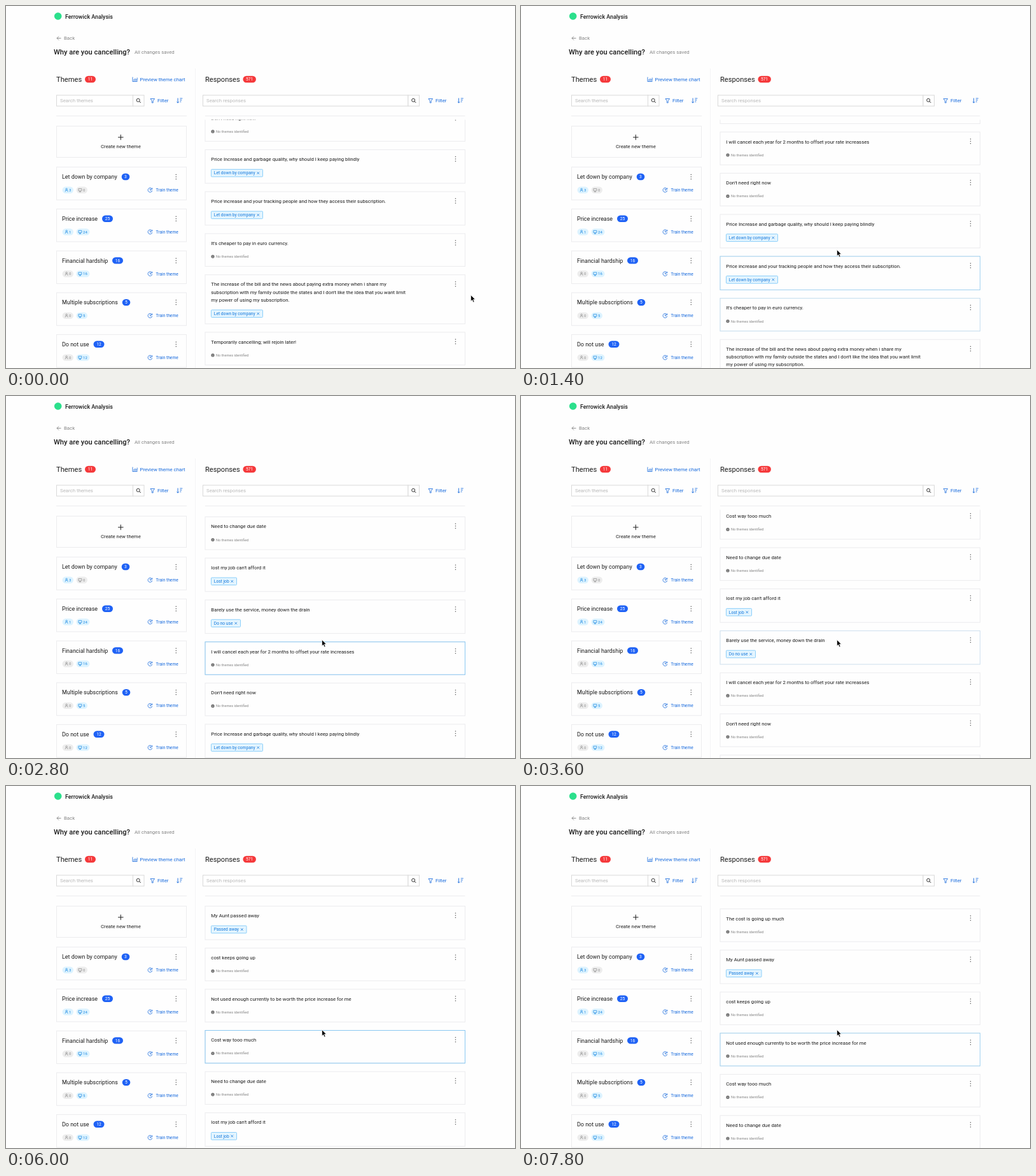
Write an HTML page that moves like this. It is 800 by 568 pixels and loops after 8000 ms.

```html
<!DOCTYPE html>
<html lang="en">
<head>
<meta charset="utf-8">
<title>Survey responses</title>
<style>
  html, body { margin: 0; width: 100%; height: 100%; overflow: hidden; background: #fefefe; }
  svg { display: block; width: 800px; height: 568px; font-family: Roboto, sans-serif; }
</style>
</head>
<body>
<svg id="stage" viewBox="0 0 800 568"></svg>
<script>
const BLUE = '#1468dc', INK = '#1c1c1c', GREY = '#858585', EDGE = '#ececee';
const SIZE = { title: 11.16, name: 8.93, body: 7.81, small: 6.7, count: 6, tiny: 5.58 };

// y is the middle of the capital letters
const text = (x, y, str, size = SIZE.body, fill = INK, extra = '') =>
  `<text x="${x}" y="${y + size * 0.355}" font-size="${size}" fill="${fill}" ${extra}>${str}</text>`;
const centred = (x, y, str, size, fill) => text(x, y, str, size, fill, 'text-anchor="middle"');
const box = (x, y, w, h, stroke = EDGE, fill = 'none', extra = '') =>
  `<rect x="${x}" y="${y}" width="${w}" height="${h}" stroke="${stroke}" fill="${fill}" ${extra}/>`;
const stroke = (d, color = INK, width = 0.8, extra = '') =>
  `<path d="${d}" fill="none" stroke="${color}" stroke-width="${width}" ${extra}/>`;
const dot = (x, y, r, fill) => `<circle cx="${x}" cy="${y}" r="${r}" fill="${fill}"/>`;
const pill = (x, y, w, h, fill) => box(x, y - h / 2, w, h, 'none', fill, `rx="${h / 2}"`);
const badge = (x, y, n, w, fill) => pill(x - w / 2, y, w, 10.4, fill) + centred(x, y, n, SIZE.small, '#fff');
const kebab = (x, y) => [-3.5, 0, 3.5].map(d => dot(x, y + d, 0.75, '#555')).join('');

function searchBar(x, width, label, filterX, sortX) {
  const split = x + width, cx = split + 8.2;
  return box(x, 140, width, 17, '#d9d9d9', '#fff') + box(split, 140, 17.5, 17, '#d9d9d9', '#fff')
    + text(x + 5.5, 148.5, label, SIZE.body, '#b8b8b8')
    + `<circle cx="${cx}" cy="147.8" r="2.5" fill="none" stroke="${INK}" stroke-width=".9"/>`
    + stroke(`M${cx + 1.8} 149.6l2.2 2.2`, INK, 1)
    + stroke(`M${filterX - 11} 145.5h6.6l-2.4 3.4v3h-1.8v-3z`, BLUE, 0.8)
    + text(filterX, 148.5, 'Filter', SIZE.body, BLUE)
    + stroke(`M${sortX - 2.2} 144.5v7.6m-1.6-1.8l1.6 1.8l1.6-1.8M${sortX + 1} 145h4m-4 2.6h3m-3 2.6h2`, BLUE, 0.9);
}

function miniPill(x, y, n, icon) {
  const on = n > 0, color = on ? '#1585e0' : '#8a8a8a';
  const shape = icon === 'person'
    ? `M${x + 4.6} ${y + 2.6}q0-2.6 2-2.6t2 2.6M${x + 5.3} ${y - 1.3}a1.3 1.3 0 1 0 2.6 0a1.3 1.3 0 1 0-2.6 0`
    : `M${x + 3.4} ${y - 2.2}h5v3.4h-5zm1 5h3m-1.5-1.5v1.5`;
  return pill(x, y, n > 9 ? 21 : 17.5, 10.4, on ? '#ddf3ff' : '#ededed')
    + stroke(shape, color, 0.7) + text(x + 10.6, y, n, SIZE.count, color);
}

function themeCard([name, total, badgeX, people, messages], i) {
  const y = 268 + i * 65.7, low = y + 20.8;
  return box(79.5, y - 15.2, 204, 51.4) + text(88, y, name, SIZE.name)
    + badge(badgeX, y, total, total > 9 ? 17 : 12.6, '#1f62f5') + kebab(267.3, y)
    + miniPill(88.5, low, people, 'person') + miniPill(110.5, low, messages, 'screen')
    + stroke(`M229.4 ${low - 1.8}a3.4 3.4 0 1 0 .4 2.6M226.5 ${low - 2}v2.2h2M229.8 ${low - 3.4}v2h-2`, BLUE, 0.8)
    + text(235.5, low, 'Train theme', SIZE.small, BLUE);
}

const themes = [
  ['Let down by company', 3, 188, 3, 0],
  ['Price increase', 25, 159.5, 1, 24],
  ['Financial hardship', 16, 175.5, 0, 16],
  ['Multiple subscriptions', 5, 189, 0, 5],
  ['Do not use', 12, 146, 0, 12],
];

const tagWidths = { 'Let down by company': 81, 'Lost job': 40, 'Do no use': 46, 'Passed away': 55.5 };
const responses = [
  ['The cost is going up much'],
  ['My Aunt passed away', 'Passed away'],
  ['cost keeps going up'],
  ['Not used enough currently to be worth the price increase for me'],
  ['Cost way tooo much'],
  ['Need to change due date'],
  ["lost my job can't afford it", 'Lost job'],
  ['Barely use the service, money down the drain', 'Do no use'],
  ['I will cancel each year for 2 months to offset your rate increasses'],
  ["Don't need right now"],
  ['Price Increase and garbage quality, why should I keep paying blindly', 'Let down by company'],
  ['Price increase and your tracking people and how they access their subscription.', 'Let down by company'],
  ["It's cheaper to pay in euro currency."],
  ["The increase of the bill and the news about paying extra money when i share my|subscription with my family outside the states and I don't like the idea that you want limit|my power of using my subscription.", 'Let down by company'],
  ['Temporarily cancelling; will rejoin later!'],
];

function responseList() {
  let y = -409.1;
  return responses.map(([body, tag]) => {
    const lines = body.split('|'), extra = (lines.length - 1) * 12.2;
    const height = (tag ? 52.6 : 51.4) + extra, low = y + extra + 21;
    let out = box(313, y - 15, 408.5, height)
      + box(313, y - 15, 408.5, height, '#8ac8f2', 'none', 'class="hover" opacity="0"')
      + lines.map((line, i) => text(322.3, y + i * 12.2, line)).join('') + kebab(706.5, y - 0.5);
    if (tag) {
      const w = tagWidths[tag], cx = 322.5 + w - 7.2;
      out += box(322.5, low - 5.2, w, 11.6, '#8ccffa', '#e4f5ff', 'rx="1"')
        + text(326.8, low + 0.6, tag, SIZE.small, '#1378dc')
        + stroke(`M${cx - 1.8} ${low - 1.2}l3.6 3.6m0-3.6l-3.6 3.6`, '#1378dc', 0.8);
    } else {
      out += dot(325, low, 2.6, '#707070') + stroke(`M325 ${low - 1.5}v.7m0 .6v1.8`, '#fff', 0.6)
        + text(330, low, 'No themes identified', SIZE.tiny, GREY);
    }
    y += height + 13.2;
    return out;
  }).join('');
}

const stage = document.getElementById('stage');
stage.innerHTML =
  dot(81.7, 16, 5.8, '#2be08c') + text(93, 16.8, 'Ferrowick Analysis', SIZE.name, INK, 'font-weight="500"')
  + stroke('M86.5 50.5h-6.5m3-3l-3 3l3 3', '#777') + text(91, 50.5, 'Back', SIZE.body, GREY)
  + text(75, 72.3, 'Why are you cancelling?', SIZE.title, INK, 'font-weight="500"')
  + text(202, 72.3, 'All changes saved', SIZE.body, GREY)
  + stroke('M297.5 98V568', '#f4f4f5', 1)
  + text(79, 115.3, 'Themes', SIZE.title) + badge(132.5, 115, 11, 17, '#f5393b')
  + stroke('M199 111.5v7h7.5M201 117.5v-2.5m1.8 2.5v-4m1.8 4v-3m1.6 3v-5', BLUE, 0.8)
  + text(210.5, 115.2, 'Preview theme chart', SIZE.body, BLUE)
  + text(313, 115.3, 'Responses', SIZE.title) + badge(382.7, 115, 571, 20.5, '#f5393b')
  + searchBar(79.5, 120, 'Search themes', 238, 272.3)
  + searchBar(309.5, 322.5, 'Search responses', 675, 713.8)
  + stroke('M79 172.5H284M313 172.5H721.5', EDGE, 1)
  + box(79.5, 188.5, 204, 49) + stroke('M180.3 201.8v8.4m-4.2-4.2h8.4', INK, 1)
  + centred(180.4, 220.2, 'Create new theme', SIZE.body, INK)
  + themes.map(themeCard).join('')
  + '<clipPath id="view"><path d="M300 178.5H740V568H300z"/></clipPath>'
  + `<g clip-path="url(#view)"><g id="list">${responseList()}</g></g>`
  + '<path id="cursor" d="M0 0v9.6l2.2-2l1.6 3.7l1.7-.7l-1.6-3.6h3z" fill="#000" stroke="#fff" stroke-width=".7"/>';

const list = document.getElementById('list');
const cursor = document.getElementById('cursor');
const hovers = [...document.querySelectorAll('.hover')];

// [time, scroll distance]
const scrollKeys = [[0, 0], [1200, 0], [1400, 101.5], [1800, 215], [2000, 255], [2400, 280], [2600, 280],
  [2800, 289.5], [3200, 326], [3600, 337.9], [4000, 390], [4600, 427], [5000, 431.7], [5400, 431.7],
  [5800, 502], [6000, 548], [6600, 590], [7200, 598], [7600, 598], [7800, 616.9], [8000, 616.9]];
// [start, end, card, strength]
const hoverSpans = [[400, 800, 13, 1], [800, 1400, 12, 1], [1400, 1600, 12, 0.4], [1400, 1600, 11, 0.75],
  [1600, 1800, 10, 0.7], [1800, 2000, 9, 0.7], [2000, 3200, 8, 1], [3600, 3800, 7, 0.3], [3800, 4000, 7, 1],
  [4000, 4400, 6, 1], [4600, 5600, 5, 1], [5800, 6200, 4, 1], [6400, 7800, 3, 1], [7800, 8000, 3, 0.75]];

function scrollAt(t) {
  const i = scrollKeys.findIndex(([time]) => time > t);
  const [t0, y0] = scrollKeys[i - 1], [t1, y1] = scrollKeys[i];
  return y0 + (y1 - y0) * (t - t0) / (t1 - t0);
}

function draw(now) {
  const t = Math.floor((now % 8000) / 200) * 200;
  list.setAttribute('transform', `translate(0 ${scrollAt(t)})`);
  const p = Math.min(t / 1000, 1), move = p * p * (3 - 2 * p);
  cursor.setAttribute('transform', `translate(${730.6 - 234 * move} ${453.6 - 71 * move})`);
  hovers.forEach((rect, card) => {
    const span = hoverSpans.find(([from, to, c]) => c === card && t >= from && t < to);
    rect.setAttribute('opacity', span ? span[3] : 0);
  });
}

const start = performance.now();
function tick() {
  draw(performance.now() - start);
  requestAnimationFrame(tick);
}
tick();
</script>
</body>
</html>
```
